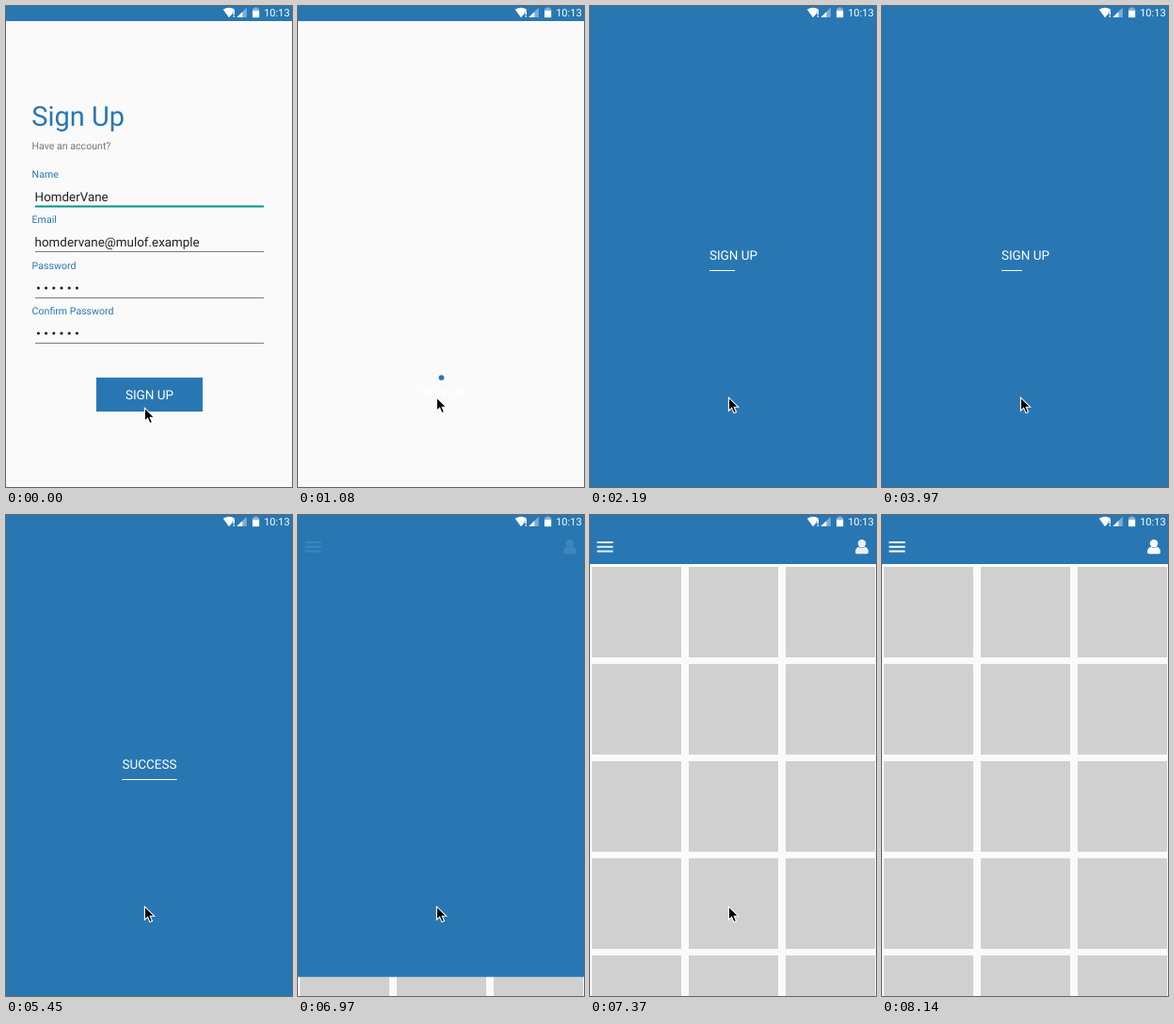
Recreate the animation shown at these times as an HTML page. Size 304 px wide and 510 px high, loop 9240 ms.

```html
<!DOCTYPE html>
<html lang="en">
<head>
<meta charset="utf-8">
<title>Sign up</title>
<style>
  html, body { margin: 0; width: 100%; height: 100%; overflow: hidden; background: #fafafa; }
  svg { display: block; width: 100%; height: 100%; }
  text { font-family: Roboto, sans-serif; text-rendering: geometricPrecision; }
  .blue { fill: #2877b3; }
  .label { font-size: 10.6px; }
  .value { font-size: 13.4px; fill: #212121; }
  .caps { font-size: 13.5px; fill: #fff; text-anchor: middle; }
  .white { fill: #fff; }
</style>
</head>
<body>
<svg viewBox="0 0 304 510">
  <rect width="304" height="510" fill="#fafafa"/>

  <g id="form">
    <text class="blue" x="27.3" y="127" font-size="29">Sign Up</text>
    <text class="label" x="27.5" y="152" fill="#757575">Have an account?</text>
    <g id="fields"></g>
    <rect id="caret" x="31" y="192" width="1" height="18" fill="#009688"/>
    <rect class="blue" x="96" y="394" width="113" height="36"/>
    <text class="caps" x="152.5" y="417">SIGN UP</text>
  </g>

  <g id="loading">
    <circle id="reveal" class="blue" cx="152.5" cy="394"/>
    <text id="signUp" class="caps">SIGN UP</text>
    <text id="success" class="caps" y="268.5">SUCCESS</text>
    <rect id="line" class="white" y="280" height="1"/>
  </g>

  <g id="home">
    <g id="grid" fill="#d0d0d0"></g>
    <rect id="panel" class="blue" width="304"/>
    <g id="icons" class="white">
      <path d="M7.5 28h17v2h-17zM7.5 32.7h17v2h-17zM7.5 37.4h17v2h-17z"/>
      <circle cx="289" cy="30.2" r="4.2"/>
      <path d="M282 39.5c0-3.6 1.6-5.5 4-5.5q3 1.8 6 0c2.4 0 4 1.9 4 5.5q0 1.8-2 1.8h-10q-2 0-2-1.8z"/>
    </g>
  </g>

  <rect class="blue" width="304" height="16"/>
  <g class="white">
    <path d="M230.8 3.8q6.2-4.2 12.4 0l-2.4 3v1.2L237 12.2z"/>
    <path d="M241.5 5h1.5v4.2h-1.5zM241.5 10.3h1.5v1.5h-1.5z"/>
    <path d="M245.3 12L255.8 1.8V12z" opacity=".4"/>
    <path d="M245.3 12L251.3 6.2V12z"/>
    <path d="M264 1.5h3.4v1.2h1.8v2.3h-7.2V2.7h2z" opacity=".45"/>
    <rect x="262" y="5" width="7.2" height="7.2"/>
    <text x="274.2" y="11" font-size="11">10:13</text>
  </g>

  <path id="cursor" d="M.4 1.2V15.2L3.6 12.2 6 17.6 8.5 16.5 6.2 11.2H10.6z"
        fill="#000" stroke="#fff" stroke-width="1.1"/>
</svg>

<script>
const LOOP = 9240;
const $ = id => document.getElementById(id);
const SVG_NS = 'http://www.w3.org/2000/svg';

function add(parent, tag, attrs, text = '') {
  const el = document.createElementNS(SVG_NS, tag);
  set(el, attrs);
  el.textContent = text;
  parent.append(el);
}
function set(el, attrs) {
  for (const key in attrs) el.setAttribute(key, attrs[key]);
}
const show = (el, on) => set(el, { visibility: on ? 'visible' : 'hidden' });

const progress = (t, start, length) => Math.min(1, Math.max(0, (t - start) / length));
const ease = p => (1 - Math.cos(Math.PI * p)) / 2;
const mix = (a, b, p) => a + (b - a) * p;

const FIELDS = [
  ['Name', 'HomderVane'],
  ['Email', 'homdervane@mulof.example'],
  ['Password', null],
  ['Confirm Password', null]
];
FIELDS.forEach(([label, value], i) => {
  const y = Math.round(i * 48.3), focused = i === 0;
  add($('fields'), 'text', { class: 'label blue', x: 27.6, y: 182 + y }, label);
  if (value) add($('fields'), 'text', { class: 'value', x: 30.6, y: 207 + y }, value);
  else for (let k = 0; k < 6; k++)
    add($('fields'), 'circle', { cx: 34.4 + k * 8.2, cy: 202 + y, r: 1.6, fill: '#212121' });
  add($('fields'), 'rect', {
    x: 31, y: 212 + y - (focused ? 0.5 : 0), width: 243, height: focused ? 2 : 1,
    fill: focused ? '#009688' : '#7d7d7d'
  });
});

for (let row = 0; row < 5; row++)
  for (let col = 0; col < 3; col++)
    add($('grid'), 'rect', { x: 2 + col * 103, y: 55 + row * 103, width: 95, height: 96 });

const SUBMIT = 1055, LOAD = 1694, CYCLE = 937, CYCLES = 3, DONE = 4920, OPEN = 6915;

// time, x, y of the pointer tip
const POINTER = [
  [75, 147, 425], [210, 147, 416.5], [345, 147, 416.5], [510, 147, 414],
  [7680, 147, 414], [7830, 167, 434], [8140, 245, 513]
];
function pointerAt(t) {
  const next = POINTER.findIndex(k => k[0] > t);
  if (next === 0) return POINTER[0].slice(1);
  if (next < 0) return POINTER.at(-1).slice(1);
  const [a, b] = [POINTER[next - 1], POINTER[next]];
  const p = progress(t, a[0], b[0] - a[0]);
  return [mix(a[1], b[1], p), mix(a[2], b[2], p)];
}

function drawLoading(t) {
  set($('reveal'), { r: 430 * ease(progress(t, SUBMIT, 500)) });
  const swap = ease(progress(t, DONE, 510));
  set($('signUp'), {
    x: 152.5 - 30 * swap,
    y: mix(417, 268.5, ease(progress(t, SUBMIT, 300))),
    opacity: 1 - swap
  });
  set($('success'), { x: 152.5 + 30 * (1 - swap), opacity: swap });

  const turns = Math.max(0, (t - LOAD) / CYCLE);
  const fill = turns < CYCLES ? turns % 1 : 1;
  set($('line'), { x: mix(127, 123.3, swap), width: mix(51 * fill, 58.4, swap) });
}

function drawHome(t) {
  set($('panel'), { height: mix(510, 52, ease(progress(t, OPEN, 415))) });
  set($('icons'), { opacity: progress(t, OPEN, 510) });
}

function draw(t) {
  show($('form'), t < SUBMIT);
  show($('caret'), t >= 435 && t < 930);
  show($('loading'), t >= SUBMIT && t < OPEN);
  show($('home'), t >= OPEN);
  drawLoading(t);
  drawHome(t);
  set($('cursor'), { transform: `translate(${pointerAt(t)})` });
}

const begin = performance.now();
function tick() {
  draw((performance.now() - begin) % LOOP);
  requestAnimationFrame(tick);
}
tick();
</script>
</body>
</html>
```
